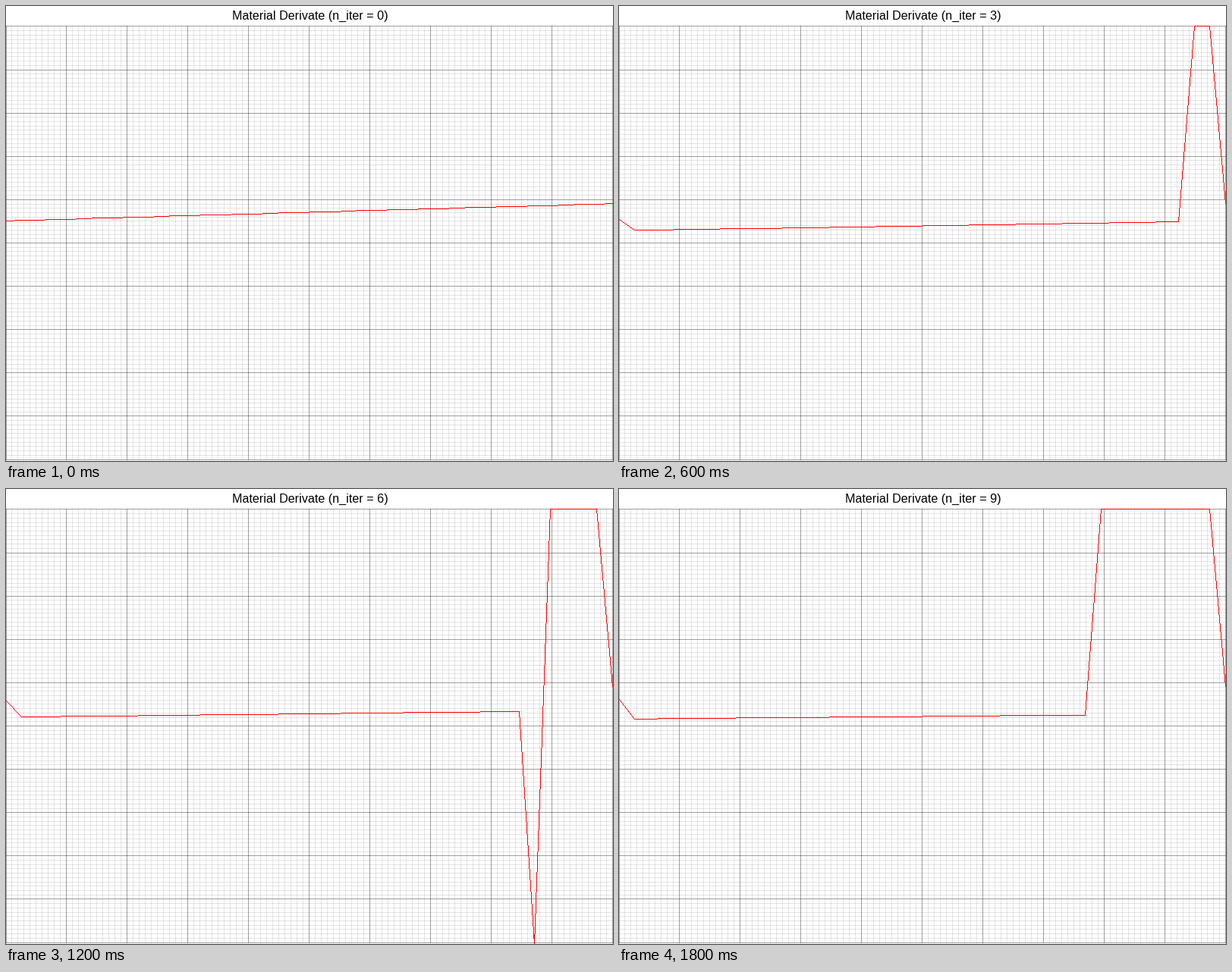
Write a matplotlib script that moves like this. It is 800 by 600 pixels and loops after 2 s.

```python
import numpy as np
import matplotlib.pyplot as plt
from matplotlib.animation import FuncAnimation
from matplotlib.collections import LineCollection

W, H, DPI = 800, 600, 100
PX = 72 / DPI                      # one pixel in points
TOP, BOTTOM = 26.9, 598.1          # plot range in rows
ZERO = 312.3                       # row of the value zero
POINTS, STEPS = 40, 10
OVERFLOW = 2.0 ** 63               # larger values wrap to the top edge
RED = (255, 0, 0, 255)

fig = plt.figure(figsize=(W / DPI, H / DPI), dpi=DPI, facecolor="white")
ax = fig.add_axes([0, 0, 1, 1])
ax.axis("off")


def add_grid(parts, alpha):
    """Draw one-pixel lines that split the plot into parts x parts cells."""
    k = np.arange(parts + 1)
    cols = np.floor(k * (W - 1) / parts) + 0.5
    rows = np.floor(TOP + k * (BOTTOM - TOP) / parts) + 0.5
    lines = [[(x, int(TOP)), (x, int(BOTTOM) + 1)] for x in cols]
    lines += [[(0, y), (W, y)] for y in rows]
    ax.add_collection(LineCollection(
        lines, colors=[(0, 0, 0, alpha)], linewidths=PX, snap=False,
        capstyle="butt"), autolim=False)


def solve():
    """Forward-difference advection of a linear profile, in pixels."""
    u = np.linspace(28.95, 51.6, POINTS)
    rate = 0.2195 / (u[1] - u[0])
    states = [u]
    for _ in range(STEPS - 1):
        new = u.copy()
        new[1:-1] -= rate * u[1:-1] * (u[2:] - u[1:-1])
        new[0] *= 1.0192
        u = new
        states.append(u)
    return states


def to_rows(u):
    y = np.where(np.abs(u) > OVERFLOW, TOP, ZERO - u)
    return np.floor(np.clip(y, TOP, H)).astype(int)


def trace(xs, ys):
    """Polyline one pixel wide, without smoothing, on a clear layer."""
    layer = np.zeros((H + 1, W, 4), np.uint8)
    for x0, y0, x1, y1 in zip(xs, ys, xs[1:], ys[1:]):
        t = np.linspace(0, 1, max(x1 - x0, abs(y1 - y0)) + 1)
        cols = np.floor(x0 + t * (x1 - x0) + 0.5).astype(int)
        rows = np.floor(y0 + t * (y1 - y0) + 0.5).astype(int)
        layer[rows, cols] = RED
    return layer[:H]


add_grid(100, 0.1)
add_grid(10, 0.3)

states = solve()
xs = np.arange(POINTS) * (W - 1) // (POINTS - 1)
curve = ax.imshow(trace(xs, to_rows(states[0])), extent=(0, W, H, 0),
                  aspect="auto", interpolation="nearest", zorder=3)
title = ax.text(400.5, 18, "", ha="center", va="baseline", color="black",
                family="Liberation Sans", fontsize=11.6)
ax.set_xlim(0, W)
ax.set_ylim(H, 0)


def draw(n):
    curve.set_data(trace(xs, to_rows(states[n])))
    title.set_text(f"Material Derivate (n_iter = {n})")
    return curve, title


anim = FuncAnimation(fig, draw, frames=STEPS, interval=200, repeat=True,
                     repeat_delay=0)
plt.show()
```
